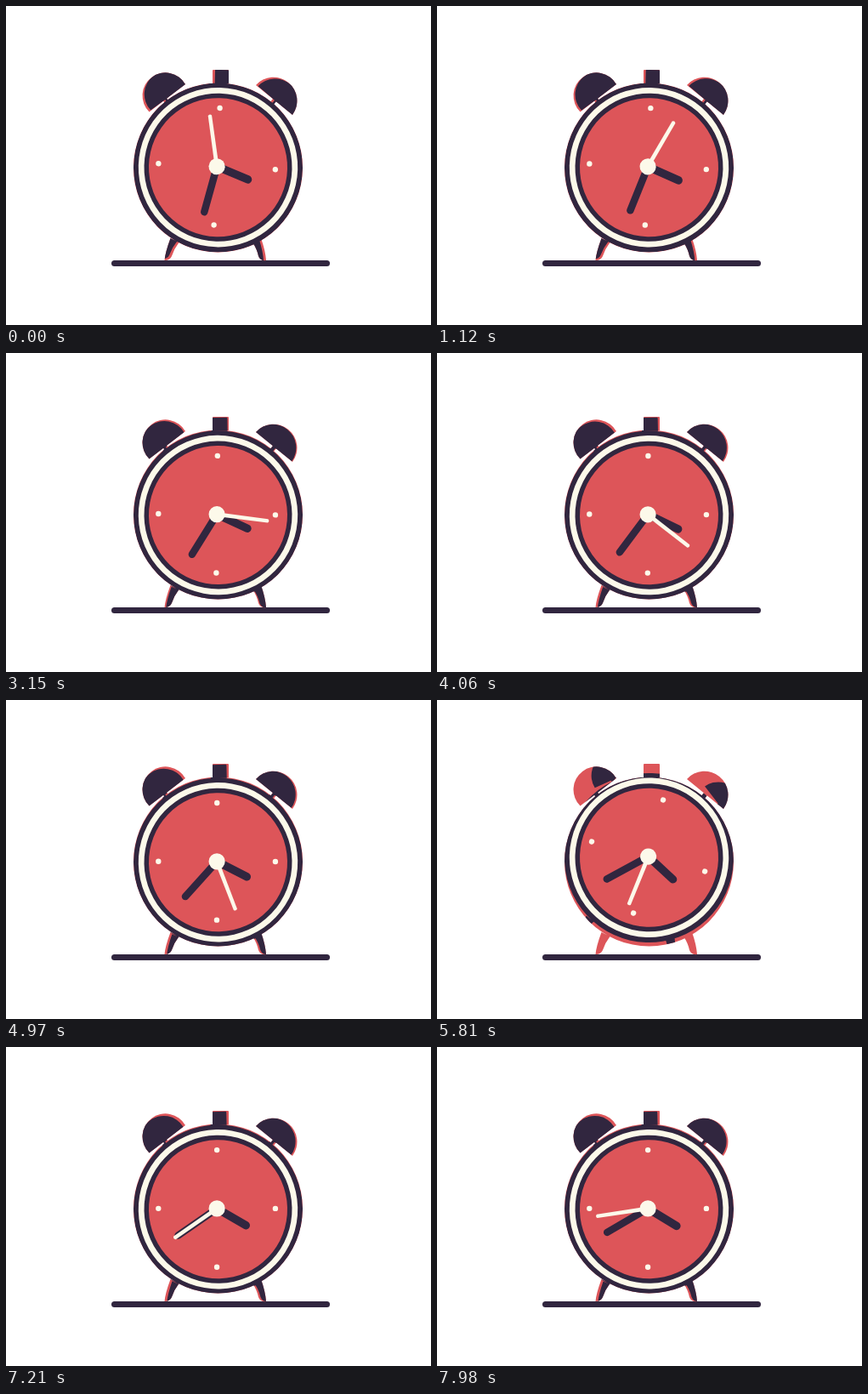
These frames come from a looping animation (500 by 375 pixels, 8000 ms). An HTML page:

```html
<!DOCTYPE html>
<html lang="en">
<head>
<meta charset="utf-8">
<title>Alarm clock</title>
<style>
  html, body { margin: 0; width: 100%; height: 100%; overflow: hidden; background: #fff; }
  svg { display: block; width: 100vw; height: 100vh; }
  .dark { fill: #31263f; }
  .red { fill: #dd5559; }
  .cream { fill: #fcf9ea; }
  line { stroke: #31263f; stroke-linecap: round; }
</style>
</head>
<body>
<svg viewBox="0 0 500 375">
  <defs>
    <!-- Case, bells with stems, button, feet. -->
    <path id="body" d="
      M150 190a99.5 99.5 0 1 1 199 0a99.5 99.5 0 1 1 -199 0Z
      M168.5 124.5A27 27 0 1 1 211 92Z
      M184 110L188 107L192 113L188 116Z
      M294 93A27.75 27.75 0 0 1 337 128Z
      M314 109L318 112L314 117L310 114Z
      M244 75H261Q262 75 262 76V91H243V76Q243 75 244 75Z
      M193.5 273L203.5 278Q198 285 195 294Q193 299 186.5 299Q187.5 289 193.5 273Z
      M290 278L300 273Q305 287 306 299Q299 300 297 294Q295 285 290 278Z"/>
    <clipPath id="outline"><use href="#body"/></clipPath>
  </defs>

  <line x1="127.5" y1="302.5" x2="377.5" y2="302.5" stroke-width="7"/>

  <!-- A fixed red silhouette; the leaning clock shows only inside it. -->
  <use href="#body" class="red"/>
  <g clip-path="url(#outline)">
    <g id="clock">
      <use href="#body" class="dark"/>
      <circle class="cream" cx="249.5" cy="189.7" r="93.7"/>
      <circle class="dark" cx="249.5" cy="189.7" r="87"/>
      <circle class="red" cx="249.5" cy="189.7" r="81.5"/>
    </g>
  </g>

  <g id="face">
    <g class="cream">
      <circle cy="-68.8" r="3.2"/>
      <circle cx="68.8" r="3.2"/>
      <circle cy="68.8" r="3.2"/>
      <circle cx="-68.8" r="3.2"/>
    </g>
    <line id="hour" y2="-39.5" stroke-width="9.5"/>
    <line id="minute" y2="-55.5" stroke-width="8.5"/>
    <path id="second" class="cream" d="M-2.4 0L-2.2 -60.5Q0 -63 2.2 -60.5L2.4 0Z"/>
    <circle class="cream" r="9.6"/>
  </g>
</svg>
<script>
const LOOP = 8000, STEP = 70;
const HUB = { x: 248.1, y: 189.9 };
const REST_LEAN = 1.4, REST_LIFT = 1.1;

const place = (id, transform) =>
  document.getElementById(id).setAttribute('transform', transform);

function draw(ms) {
  const t = ms / 1000;
  const hop = Math.exp(-(((ms - 5810) / 260) ** 2));
  const settle = 2.9 / (1 + (ms / 2240) ** 4);
  const lean = settle + 14.65 * hop;
  const lift = 0.4 * lean;

  place('clock', `translate(0 ${REST_LIFT - lift}) rotate(${lean - REST_LEAN} ${HUB.x} ${HUB.y})`);
  place('face', `translate(${HUB.x + 0.5 * hop} ${HUB.y - lift}) rotate(${lean})`);
  place('hour', `rotate(${109.8 + 1.43 * t})`);
  place('minute', `rotate(${192.6 + 5.9 * t})`);
  place('second', `rotate(${-10.7 + 34.1 * t})`);
}

const start = performance.now();
function tick() {
  const ms = (performance.now() - start) % LOOP;
  draw(Math.floor(ms / STEP) * STEP);
  requestAnimationFrame(tick);
}
tick();
</script>
</body>
</html>
```
